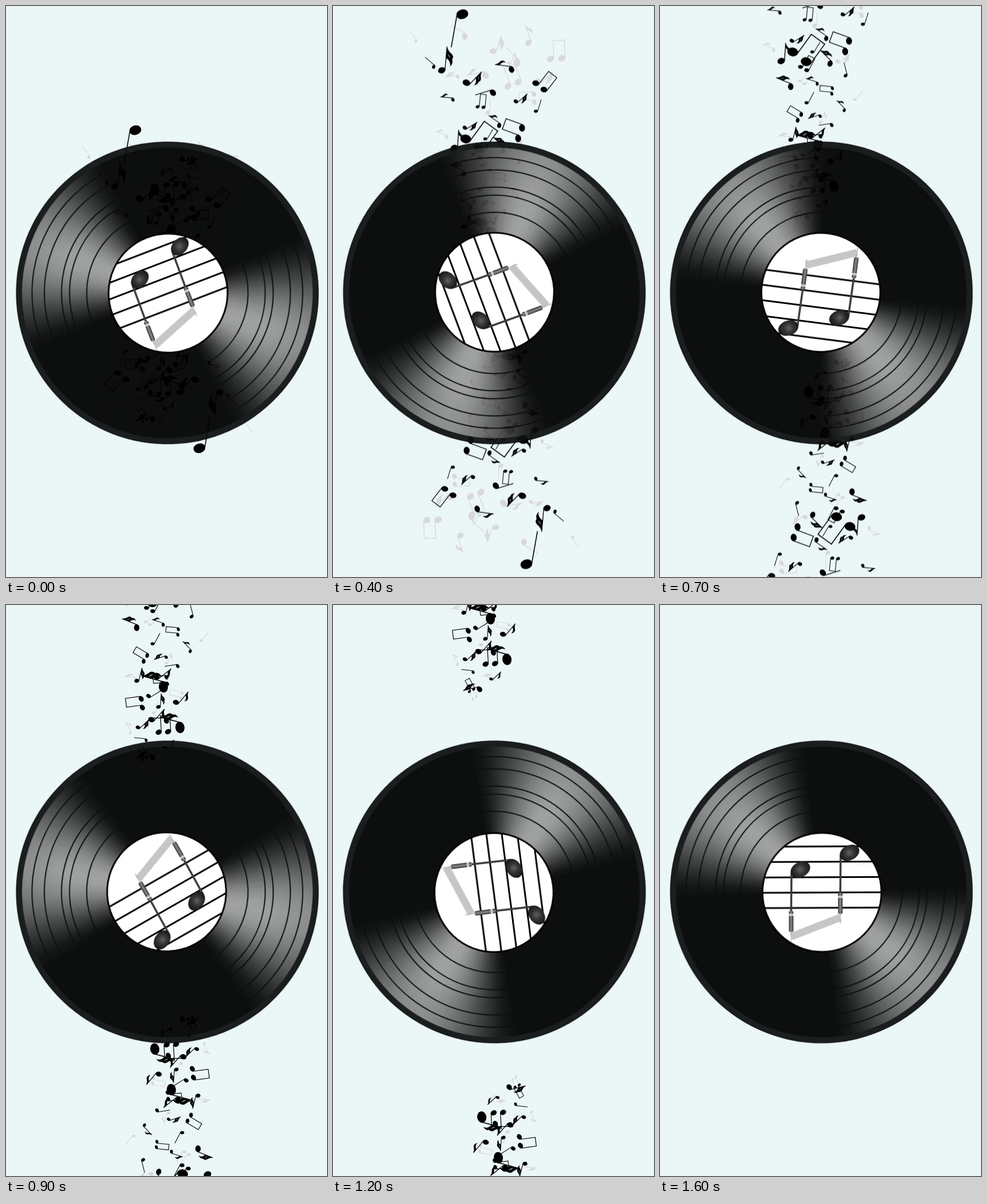
An HTML page with a canvas that plays this animation: 561 px wide and 998 px high, repeating every 1700 ms.

```html
<!DOCTYPE html>
<html lang="en">
<head>
<meta charset="utf-8">
<title>Spinning record</title>
<style>
  html, body { margin: 0; width: 561px; height: 998px; overflow: hidden; background: #ebf6f7; }
  canvas { display: block; }
</style>
</head>
<body>
<canvas id="stage" width="561" height="998"></canvas>
<script>
const W = 561, H = 998, LOOP = 1700, STEP = 100, TAU = Math.PI * 2;
const CX = 282, CY = 501.5, RADIUS = 264.5, LABEL = 104;
const ctx = document.getElementById('stage').getContext('2d');
const rad = d => d * Math.PI / 180;
const mix = (a, b, u) => a + (b - a) * u;

// Motion keys: [time, value]
const spin = [[0, -201], [200, -240.5], [500, -315.6], [900, -389.8], [1200, -457.3], [LOOP, -561]];
const travel = [[0, 0], [900, 456], [1200, 575], [1600, 800]];

function at(keys, t) {
  let i = 1;
  while (i < keys.length - 1 && keys[i][0] < t) i++;
  const [t0, a] = keys[i - 1], [t1, b] = keys[i];
  return mix(a, b, (t - t0) / (t1 - t0));
}

function random(seed) {
  return () => {
    seed = (seed * 16807) % 2147483647;
    return seed / 2147483647;
  };
}

function layer(w, h) {
  const c = document.createElement('canvas');
  c.width = w;
  c.height = h;
  return c.getContext('2d');
}

function line(g, ...p) {
  g.beginPath();
  for (let i = 0; i < p.length; i += 2) g.lineTo(p[i], p[i + 1]);
  g.stroke();
}

function circle(g, r) {
  g.beginPath();
  g.arc(0, 0, r, 0, TAU);
}

function head(g, x, r) {
  g.beginPath();
  g.ellipse(x, 0, r, r * .8, rad(-25), 0, TAU);
  g.fill();
}

function flag(g, x, y, len) {
  g.beginPath();
  g.moveTo(x, y);
  g.quadraticCurveTo(x + len * .08, y + len * .22, x + len * .28, y + len * .36);
  g.quadraticCurveTo(x + len * .46, y + len * .52, x + len * .24, y + len * .78);
  g.quadraticCurveTo(x + len * .3, y + len * .5, x, y + len * .34);
  g.fill();
}

// A beam is the distance to a second head
function note(g, { x, y, r, angle, len, flags = 0, beam = 0 }) {
  const s = r * .86;
  g.save();
  g.translate(x, y);
  g.rotate(rad(angle));
  g.lineWidth = Math.min(1.6, .8 + r * .08);
  head(g, 0, r);
  if (beam) {
    head(g, beam, r);
    line(g, s, 0, s, -len, beam + s, -len, beam + s, 0);
  } else {
    line(g, s, 0, s, -len);
  }
  for (let i = 0; i < flags; i++) flag(g, s, -len * (1 - i * .2), len * .8);
  g.restore();
}

// Notes strewn down a band that narrows from one end to the other
function scatter(g, { seed, count, top, bottom, middle, spread, size }) {
  const rnd = random(seed);
  for (let i = 0; i < count; i++) {
    const u = i / (count - 1);
    const side = (i * .618 % 1) * 2 - 1;
    const r = mix(...size, rnd() ** 1.5) * mix(1, .8, u);
    const kind = i % 4;
    note(g, {
      x: mix(...middle, u) + side * mix(...spread, u ** .7),
      y: mix(top, bottom, u) + (rnd() - .5) * 16,
      r,
      angle: mix(-110, 60, rnd()),
      len: 12 + r * 3,
      flags: kind === 3 ? 0 : kind,
      beam: kind === 3 ? r * 3 : 0
    });
  }
}

function makeStrip() {
  const g = layer(W, 700);
  g.fillStyle = g.strokeStyle = '#d9d8db';
  scatter(g, { seed: 7, count: 8, top: 150, bottom: 250, middle: [320, 330], spread: [90, 70], size: [6, 9] });
  scatter(g, { seed: 31, count: 16, top: 172, bottom: 640, middle: [280, 265], spread: [135, 45], size: [3, 5] });

  g.fillStyle = g.strokeStyle = '#000';
  scatter(g, { seed: 19, count: 40, top: 210, bottom: 626, middle: [288, 256], spread: [112, 22], size: [3.5, 7.5] });
  note(g, { x: 226, y: 118, r: 10.5, angle: 190, len: 60 });
  note(g, { x: 190, y: 216, r: 6.5, angle: 5, len: 42, flags: 2 });
  note(g, { x: 232, y: 336, r: 9.5, angle: 36, len: 44, beam: 29 });
  note(g, { x: 275, y: 500, r: 10, angle: -75, len: 42, flags: 2 });
  note(g, { x: 304, y: 571, r: 10, angle: -75, len: 38, flags: 2 });
  return g.canvas;
}

function makeDisc() {
  const g = layer(540, 540);
  g.translate(270, 270);
  circle(g, RADIUS);
  g.fillStyle = '#000';
  g.fill();
  circle(g, RADIUS - 1.2);
  g.fillStyle = '#0e1010';
  g.fill();

  // Two opposite beams of light
  const shine = g.createConicGradient(rad(-49), 0, 0);
  const half = 43;
  for (const mid of [90, 270]) {
    for (let d = -half; d <= half; d += half / 8) {
      const v = Math.round(156 * Math.max(0, Math.cos(rad(90 * d / half))) ** 1.6);
      shine.addColorStop((mid + d) / 360, `rgb(${v},${v},${v})`);
    }
  }
  circle(g, 254);
  g.fillStyle = shine;
  g.fill();

  const shade = g.createRadialGradient(0, 0, 170, 0, 0, 254);
  shade.addColorStop(0, 'rgba(0,0,0,0)');
  shade.addColorStop(1, 'rgba(0,0,0,.13)');
  g.fillStyle = shade;
  g.fill();

  g.strokeStyle = '#000';
  g.lineWidth = 2;
  for (const r of [236.5, 215, 185, 171, 141]) {
    circle(g, r);
    g.stroke();
  }
  return g.canvas;
}

function labelNote(g, x, top, bottom) {
  g.strokeStyle = '#3a3a3a';
  g.lineWidth = 3.5;
  line(g, x - 1, bottom, x, top + 50);
  g.lineWidth = 1.5;
  g.strokeStyle = '#b5b5b5';
  line(g, x, top + 20, x, top);

  const metal = g.createLinearGradient(x - 4, 0, x + 4, 0);
  metal.addColorStop(0, '#333');
  metal.addColorStop(.5, '#8a8a8a');
  metal.addColorStop(1, '#383838');
  g.fillStyle = metal;
  g.beginPath();
  g.roundRect(x - 4, top + 17, 8, 37, 3);
  g.fill();
  g.fillStyle = '#c9c9c9';
  g.fillRect(x - 4, top + 45, 8, 4);

  g.save();
  g.translate(x - 16.5, bottom + 5);
  const gloss = g.createRadialGradient(1, 0, 0, 0, 0, 17);
  gloss.addColorStop(0, '#606060');
  gloss.addColorStop(.5, '#343434');
  gloss.addColorStop(1, '#181818');
  g.fillStyle = gloss;
  g.beginPath();
  g.ellipse(0, 0, 18, 13, rad(-27), 0, TAU);
  g.fill();
  g.restore();
}

function makeLabel() {
  const g = layer(220, 220);
  g.translate(110, 110);
  circle(g, LABEL);
  g.fillStyle = '#fff';
  g.fill();
  g.save();
  g.clip();
  g.strokeStyle = '#000';
  g.lineWidth = 3;
  for (let i = 0; i < 5; i++) {
    const y = -27 + i * 26.8;
    line(g, -LABEL, y, LABEL, y);
  }
  g.strokeStyle = '#c6c6c6';
  g.lineWidth = 13;
  line(g, -32, -44, 54, -77);
  labelNote(g, -32, -55, 64);
  labelNote(g, 54, -86, 35);
  g.restore();
  g.strokeStyle = '#000';
  g.lineWidth = 3;
  circle(g, LABEL);
  g.stroke();
  return g.canvas;
}

const strip = makeStrip(), disc = makeDisc(), label = makeLabel();

function draw(t) {
  const shift = at(travel, t);
  ctx.fillStyle = '#ebf6f7';
  ctx.fillRect(0, 0, W, H);

  // One strip rises, its half-turned twin falls
  ctx.drawImage(strip, 0, 99 - shift);
  ctx.save();
  ctx.translate(564, 891 + shift);
  ctx.rotate(Math.PI);
  ctx.drawImage(strip, 0, 0);
  ctx.restore();

  // The vinyl is slightly see-through, the label is not
  ctx.save();
  ctx.translate(CX, CY);
  ctx.rotate(rad(at(spin, t)));
  ctx.globalAlpha = .945;
  ctx.drawImage(disc, -270, -270);
  ctx.globalAlpha = 1;
  ctx.drawImage(label, -111, -110.8);
  ctx.restore();
}

function tick(now) {
  draw(Math.floor(now % LOOP / STEP) * STEP);
  requestAnimationFrame(tick);
}
draw(0);
requestAnimationFrame(tick);
</script>
</body>
</html>
```
